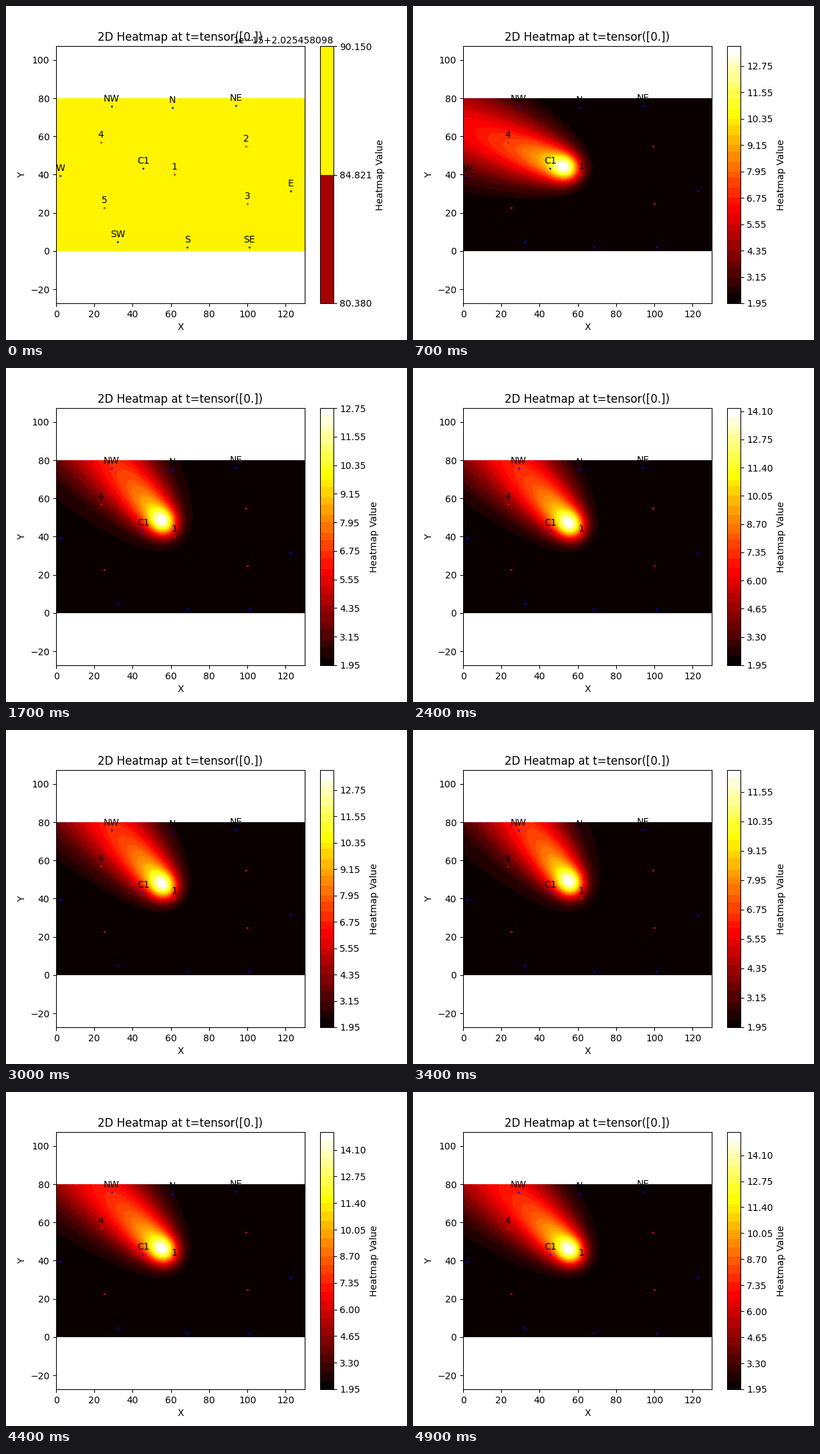
A matplotlib script for the animation above (5 s loop, 600 by 500 pixels).

```python
import numpy as np
import matplotlib.pyplot as plt
from matplotlib.animation import FuncAnimation

FRAMES, INTERVAL = 50, 100
WIDTH, DEPTH = 130, 80
BACKGROUND = 2.0254581

STATIONS = {
    "NW": (29, 75.8), "N": (60.8, 75.1), "NE": (94, 76.1), "W": (2.2, 39.4),
    "E": (122.7, 31.4), "SW": (32.2, 4.9), "S": (68.5, 2.1), "SE": (101, 2.1),
    "C1": (45.6, 43.3),
}
SOURCES = {
    "1": (61.9, 40.1), "2": (99.4, 54.8), "3": (100, 24.8),
    "4": (23.4, 56.9), "5": (25.2, 22.7),
}

# turning points of the highest concentration
TURN_FRAMES = [7, 17, 24, 30, 35, 39, 49]
TURN_PEAKS = [13.6, 12.7, 14.2, 13.6, 12.07, 14.5, 15.25]

X, Y = np.meshgrid(np.linspace(0, WIDTH, 131), np.linspace(0, DEPTH, 81))
DRIFT = np.linspace(0, 160, 81)[:, None, None]
SPREAD = 4.5 ** 2 + 3.5 * DRIFT


def state(frame):
    """Peak value, hot spot and wind direction; the early swing fades out."""
    peak = np.interp(frame, TURN_FRAMES, TURN_PEAKS)
    swing = np.exp(-(frame / 9) ** 2)
    excess = peak - 12.7
    x = 55.2 - 5 * swing
    y = 48.8 - 1.07 * excess - 6.6 * swing
    angle = np.radians(129 + 2.8 * excess + 49 * swing)
    return peak, x, y, angle


def plume(frame):
    """Spreading puffs carried by the wind, plus a compact core."""
    peak, x, y, angle = state(frame)
    dx, dy = np.cos(angle), np.sin(angle)
    along = (X - x) * dx + (Y - y) * dy
    across = (Y - y) * dx - (X - x) * dy
    puffs = np.exp(-((along + 4 - DRIFT) ** 2 + across ** 2) / (2 * SPREAD))
    tail = (puffs / SPREAD).sum(axis=0)
    core = np.exp(-(along ** 2 + across ** 2) / (2 * 4 ** 2))
    field = 0.82 * tail / tail.max() + 0.18 * core
    return BACKGROUND + (peak - BACKGROUND) * field / field.max()


def draw_flat_field(ax):
    """Uniform field: two levels only, with an offset above the bar."""
    heat = ax.contourf(X, Y, np.full_like(X, 87.0),
                       levels=[80.380, 84.821, 90.150], cmap="hot")
    bar = fig.colorbar(heat, ax=ax, label="Heatmap Value", format="%.3f")
    bar.ax.annotate("1e\u221215+2.025458098", (1, 1), xycoords="axes fraction",
                    xytext=(0, 3), textcoords="offset points", ha="right")


def draw_plume(ax, frame):
    heat = ax.contourf(X, Y, plume(frame), levels=100,
                       cmap=plt.get_cmap("hot", 29))
    fig.colorbar(heat, ax=ax, label="Heatmap Value")


def draw_sensors(ax, sensors, color):
    for name, spot in sensors.items():
        ax.plot(*spot, "o", color=color, markersize=2, markeredgewidth=0)
        ax.annotate(name, spot, xytext=(0, 5), textcoords="offset points",
                    ha="center")


fig = plt.figure(figsize=(6, 5), dpi=100)


def draw(frame):
    fig.clear()
    ax = fig.add_subplot()
    if frame == 0:
        draw_flat_field(ax)
    else:
        draw_plume(ax, frame)
    draw_sensors(ax, STATIONS, "blue")
    draw_sensors(ax, SOURCES, "red")

    # equal scale on both axes, centred on the field
    box = ax.get_position()
    half = WIDTH / 2 * (box.height * 5) / (box.width * 6)
    ax.set(xlim=(0, WIDTH), ylim=(DEPTH / 2 - half, DEPTH / 2 + half),
           xlabel="X", ylabel="Y", title="2D Heatmap at t=tensor([0.])")


anim = FuncAnimation(fig, draw, frames=FRAMES, interval=INTERVAL,
                     repeat=True, repeat_delay=0)
plt.show()
```
